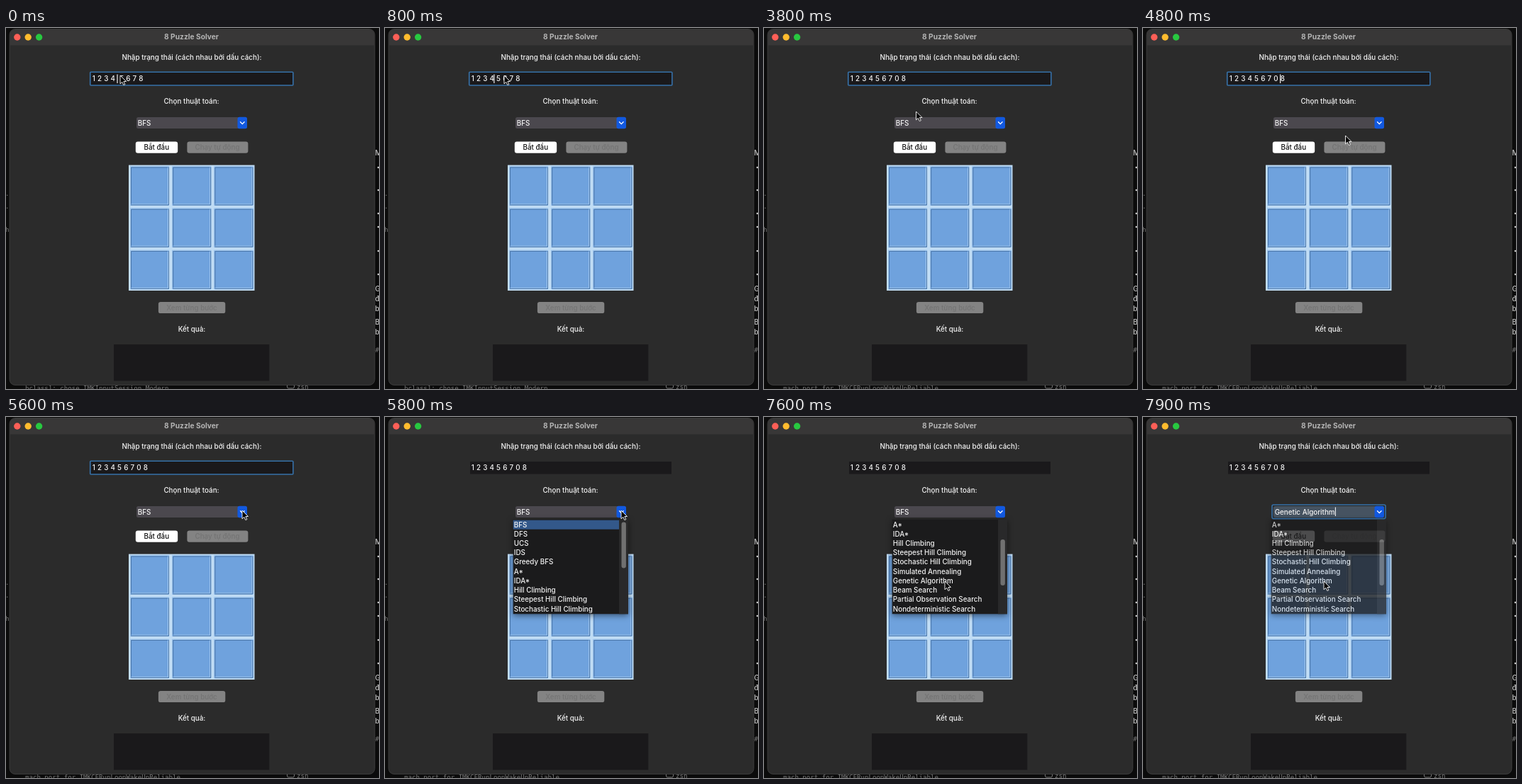
An HTML page that plays this animation: 526x510 px, repeating every 8000 ms.

```html
<!DOCTYPE html>
<html lang="vi">
<head>
<meta charset="utf-8">
<title>8 Puzzle Solver</title>
<style>
html, body { margin: 0; width: 100%; height: 100%; overflow: hidden; background: #0b0b0b; }
svg { display: block; }
text { font: 500 9.85px Inter, sans-serif; fill: #f4f4f4; white-space: pre; }
.mid { text-anchor: middle; }
.title { font-weight: 700; font-size: 10.2px; fill: #b4b4b4; }
.log { font: 9.1px "DejaVu Sans Mono", monospace; fill: #777; }
.off { fill: #747474; }
.dark { fill: #111; }
.field { fill: #1a191b; }
.ring { fill: none; stroke: #3570a8; stroke-width: 1.6; }
#entry { word-spacing: .5px; }
#desk text:not(.log) { fill: #c4c4c4; }
#popup { filter: drop-shadow(0 2px 4px rgba(0, 0, 0, .5)); }
</style>
</head>
<body>
<svg id="stage" width="526" height="510" viewBox="0 0 526 510">
  <g id="desk"></g>
  <text id="log" class="log" x="27" y="512"></text>
  <rect x="396.5" y="501" width="10" height="8" rx="2" fill="none" stroke="#777"/>
  <text class="log" x="410" y="509.5">zsh</text>

  <rect x="5" y="1.5" width="515" height="503" rx="8" fill="#2b2b2b" stroke="#454545" stroke-width=".8"/>
  <path d="M5.4 24.5V10Q5.4 2 13 2H512Q519.6 2 519.6 10V24.5Z" fill="#383737"/>
  <circle cx="15.8" cy="13" r="4.7" fill="#fe5f57"/>
  <circle cx="31.2" cy="13" r="4.7" fill="#febc2e"/>
  <circle cx="46.6" cy="13" r="4.7" fill="#28c840"/>
  <text class="mid title" x="261.5" y="15.6">8 Puzzle Solver</text>

  <text class="mid" x="262" y="45">Nhập trạng thái (cách nhau bởi dấu cách):</text>
  <rect class="field" x="120" y="63" width="284" height="17.5"/>
  <rect id="entryRing" class="ring" x="118.7" y="62.2" width="286.2" height="18.8" rx="1"/>
  <text id="entry" x="121.8" y="75.3"></text>
  <rect id="caret" y="65.5" width="1.1" height="12.5" fill="#fff"/>

  <text class="mid" x="261.5" y="107.3">Chọn thuật toán:</text>
  <rect id="combo" x="184" y="126" width="156" height="16" rx="2.5" fill="#4b484e"/>
  <rect id="comboRing" class="ring" x="182" y="124" width="160" height="19.6" rx="2"/>
  <text id="choice" x="185.7" y="137.5"></text>
  <rect id="comboCaret" y="127.5" width="1" height="12.5" fill="#fff"/>
  <rect x="326.5" y="125.7" width="13.5" height="16.6" rx="2.8" fill="#1259e0"/>
  <path d="M330.5 132.8l2.8 2.8 2.8-2.8" fill="none" stroke="#fff" stroke-width="1.3" stroke-linecap="round"/>

  <rect x="182.8" y="160.6" width="59.4" height="16.2" rx="3.2" fill="#fff"/>
  <text class="mid dark" x="212.3" y="172.2">Bắt đầu</text>
  <rect x="255.4" y="160.6" width="86" height="16.2" rx="3.2" fill="#838383"/>
  <text class="mid off" x="298" y="172.2">Chạy tự động</text>
  <rect x="173" y="193.6" width="177.5" height="177.4" fill="#c0dcf4"/>
  <g id="tiles"></g>
  <rect x="214.9" y="386.9" width="94.4" height="16.2" rx="3.2" fill="#838383"/>
  <text class="mid off" x="262" y="398.6">Xem từng bước</text>
  <text class="mid" x="262" y="429.3">Kết quả:</text>
  <rect class="field" x="152" y="447" width="219.3" height="51.5"/>

  <g id="popup">
    <svg x="180.5" y="145" width="162.5" height="133.5">
      <rect width="162.5" height="133.5" fill="#1b1b1c"/>
      <g id="rows"><rect y=".7" width="149.5" height="13" fill="#33588a"/></g>
      <rect x="149.5" width="13" height="133.5" fill="#29292a"/>
      <rect id="thumb" x="153" width="6.4" height="65" rx="3.2" fill="#707070"/>
    </svg>
  </g>
  <path id="pointer" d="M0 0V11.8L2.8 9.3 4.8 13.5 6.8 12.7 4.9 8.5H8.5Z" fill="#000" stroke="#fff" stroke-width=".9"/>
</svg>
<script>
const LOOP = 8000, STEP = 100, ROW = 13.22;
const $ = id => document.getElementById(id);

function add(parent, tag, attrs, text = '') {
  const el = document.createElementNS('http://www.w3.org/2000/svg', tag);
  for (const k in attrs) el.setAttribute(k, attrs[k]);
  el.textContent = text;
  $(parent).append(el);
}
const set = (id, name, value) => $(id).setAttribute(name, value);
const show = (id, on) => set(id, 'visibility', on ? 'visible' : 'hidden');
function write(id, text) {
  if ($(id).textContent !== text) $(id).textContent = text;
}

// Strips of the desktop beside the window
[['M', 180], ['G', 371.5], ['đ', 385.5], ['b', 399.5], ['B', 418.5], ['b', 432.5]]
  .forEach(([s, y]) => add('desk', 'text', { x: 520.5, y }, s));
[197, 229, 262, 281, 315, 348].forEach(cy => add('desk', 'circle', { cx: 525, cy, r: 1.3, fill: '#c4c4c4' }));
add('desk', 'text', { class: 'log', x: 520.5, y: 458 }, '#');
[['..', 237], ['..', 255], ['h', 288]].forEach(([s, y]) => add('desk', 'text', { class: 'log', x: -1, y }, s));

// Ridged tiles
for (let i = 0; i < 9; i++) {
  const x = 175 + i % 3 * 59.2, y = 195.5 + Math.floor(i / 3) * 59.2;
  const at = `translate(${x} ${y})`;
  add('tiles', 'rect', { transform: at, width: 55, height: 55, fill: '#6fa2dd' });
  for (const [d, stroke] of [
    ['M.5 55V.5H55M53.5 2V53.5H2', '#a6cbf0'],
    ['M1.5 53V1.5H53M54.5 1V54.5H1', '#4774a8']
  ]) add('tiles', 'path', { transform: at, d, stroke, fill: 'none' });
}

['BFS', 'DFS', 'UCS', 'IDS', 'Greedy BFS', 'A*', 'IDA*', 'Hill Climbing', 'Steepest Hill Climbing',
  'Stochastic Hill Climbing', 'Simulated Annealing', 'Genetic Algorithm', 'Beam Search',
  'Partial Observation Search', 'Nondeterministic Search']
  .forEach((s, i) => add('rows', 'text', { x: 1.3, y: 10.6 + i * ROW }, s));

// [time, text, caret index]
const typing = [
  [0, '1 2 3 4  5 6 7 8', 8], [100, '1 2 3 4 5 6 7 8', 7], [1800, '1 2 3 4 5 6 7 8', 14],
  [2600, '1 2 3 4 5 6 7 08', 15], [3200, '1 2 3 4 5 6 7 0 8', 16]
];
const blinkOff = [[500, 800], [1400, 1600], [2300, 2600], [3600, 3900], [4500, 4800], [5400, 8000]];
// [time, x, y]
const path = [
  [0, 161, 67], [700, 161, 67], [800, 168, 67], [1100, 176, 69], [1200, 176, 69], [1400, 184.5, 70],
  [3400, 184.5, 70], [3900, 222, 130], [4100, 239, 160], [4300, 222, 167], [4500, 218, 167], [4700, 218, 167],
  [4800, 285.5, 152], [5600, 333, 132], [5900, 333, 132], [6100, 265, 256], [7000, 265, 256],
  [7600, 255, 232], [8000, 255, 232]
];

function pointerAt(t) {
  const i = path.findIndex(p => p[0] > t);
  const [t0, x0, y0] = path[i - 1], [t1, x1, y1] = path[i];
  const k = (t - t0) / (t1 - t0);
  return [x0 + (x1 - x0) * k, y0 + (y1 - y0) * k];
}

function draw(now) {
  const t = Math.floor(now % LOOP / STEP) * STEP;
  const [, text, index] = typing.filter(s => s[0] <= t).pop();
  write('entry', text);
  set('caret', 'x', $('entry').getStartPositionOfChar(index).x - .6);
  show('caret', !blinkOff.some(([a, b]) => t >= a && t < b));
  show('entryRing', t < 5700);
  write('log', t < 2600 ? 'bclass]: chose IMKInputSession_Modern' : 'mach port for IMKCFRunLoopWakeUpReliable');

  const open = t >= 5700, chosen = t >= 7800;
  write('choice', chosen ? 'Genetic Algorithm' : 'BFS');
  set('combo', 'fill', chosen ? '#465361' : '#4b484e');
  show('comboRing', chosen);
  show('comboCaret', chosen);
  set('comboCaret', 'x', 186 + $('choice').getComputedTextLength());

  const scroll = t < 6500 ? 0 : t < 6600 ? 2 : 5;
  $('popup').style.display = open ? '' : 'none';
  set('popup', 'opacity', t < 7900 ? 1 : .78);
  set('rows', 'transform', `translate(0 ${-scroll * ROW})`);
  set('thumb', 'y', 3.5 + scroll * 4.9);
  set('pointer', 'transform', `translate(${pointerAt(t)})`);
}

const start = performance.now();
function tick() {
  draw(performance.now() - start);
  requestAnimationFrame(tick);
}
tick();
</script>
</body>
</html>
```
